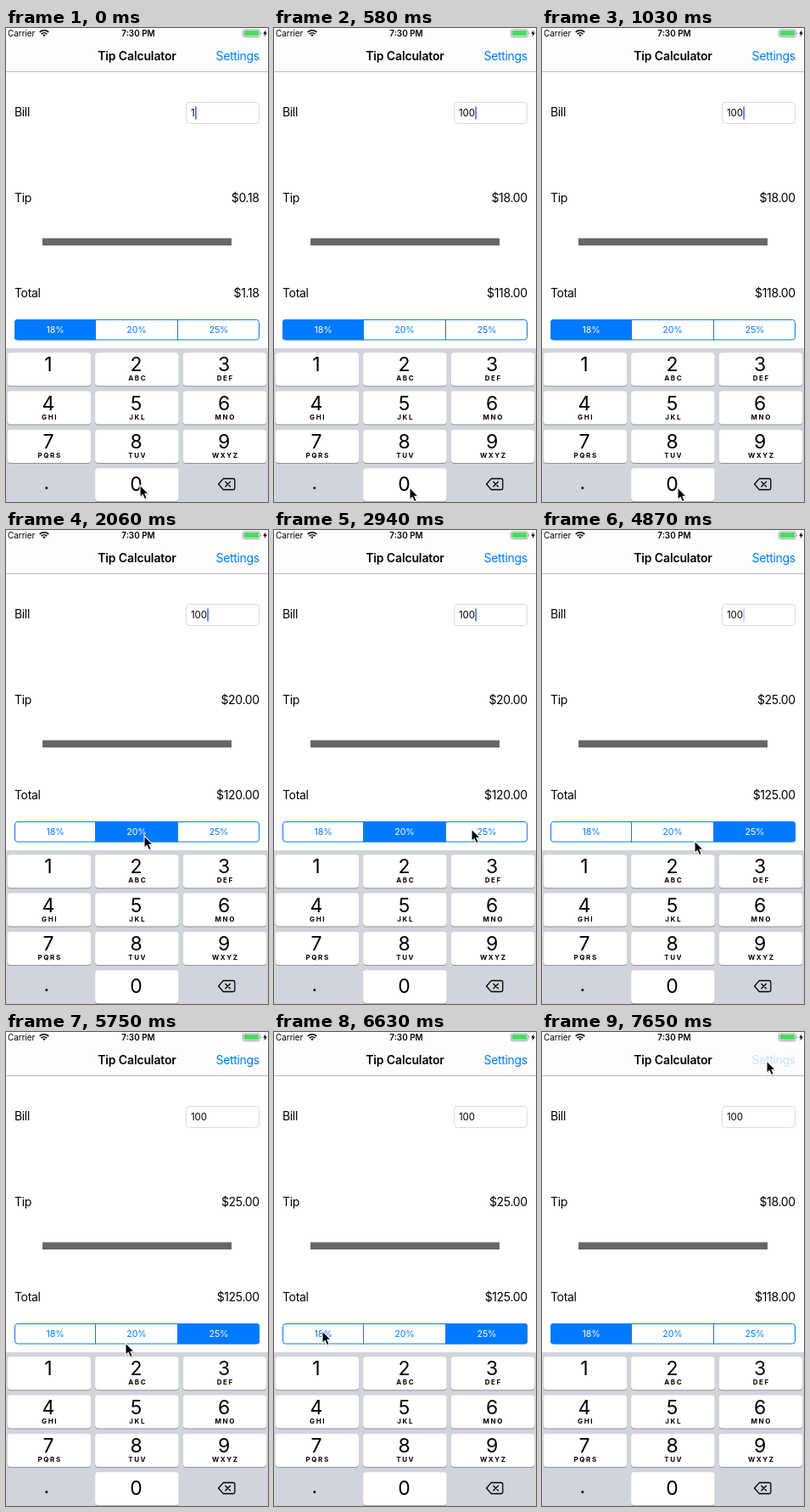
Recreate the animation shown at these times as an HTML page. Size 309x558 px, loop 8 s.

```html
<!DOCTYPE html>
<html lang="en">
<head>
<meta charset="utf-8">
<title>Tip Calculator</title>
<style>
  html, body { margin: 0; width: 100%; height: 100%; overflow: hidden; background: #fff; }
  svg { display: block; width: 309px; height: 558px; font-family: Inter, "Liberation Sans", sans-serif; }
  .body { font-size: 14px; letter-spacing: -.025em; }
  .title { font-size: 14px; font-weight: 600; letter-spacing: -.01em; }
  .status { font-size: 9.9px; }
  .field { font-size: 11.5px; letter-spacing: -.01em; }
  .seg { font-size: 10.7px; letter-spacing: -.01em; }
  .digit { font-size: 23px; }
  .abc { font-size: 8px; font-weight: 700; letter-spacing: 1.6px; }
  .mid { text-anchor: middle; }
  .end { text-anchor: end; }
</style>
</head>
<body>
<svg id="stage" viewBox="0 0 309 558">
  <rect width="309" height="51" fill="#fdfdfd"/>
  <rect y="51" width="309" height="1" fill="#bdbdbd"/>

  <text class="status" x="2" y="10">Carrier</text>
  <g fill="none" stroke="#000" stroke-width="1.7">
    <path d="M39.7 4.9a7.6 7.6 0 0 1 10.6 0M41.7 7.1a4.7 4.7 0 0 1 6.6 0"/>
    <path d="M43.4 8.3a2.3 2.3 0 0 1 3.2 0L45 10.2Z" fill="#000" stroke="none"/>
  </g>
  <text class="status mid" x="156" y="10" font-weight="600">7:30 PM</text>
  <rect x="279.4" y="1.9" width="20" height="8.6" rx="2" fill="none" stroke="#8c8c8c" stroke-width=".8"/>
  <rect x="280.6" y="3.1" width="17.6" height="6.2" rx="1" fill="#4cd964"/>
  <path d="M300.4 4.7q1.4 1.5 0 3Z" fill="#8c8c8c"/>
  <path d="M306.4 2.2 303.2 6.8H305.2L304.4 10.3 308 5.5H305.8Z"/>

  <text class="title mid" x="154.5" y="38">Tip Calculator</text>
  <text class="body end" id="settings" x="298.7" y="38" fill="#007aff">Settings</text>

  <text class="body" x="10" y="104">Bill</text>
  <text class="body" x="10" y="205">Tip</text>
  <text class="body" x="10" y="317">Total</text>
  <rect x="212.5" y="87.5" width="86" height="25" rx="4" fill="#fff" stroke="#dcdcdc"/>
  <text class="field" id="bill" x="218" y="104"></text>
  <rect id="caret" y="92.5" width="1.6" height="15" fill="#426bf2"/>
  <text class="body end" id="tip" x="298.7" y="204.5"></text>
  <text class="body end" id="total" x="298.7" y="317"></text>
  <rect x="43" y="247.5" width="223" height="8.5" fill="#666"/>

  <clipPath id="pill"><rect x="10" y="343" width="289" height="24.5" rx="3.5"/></clipPath>
  <g id="segs" clip-path="url(#pill)"></g>
  <path d="M105.5 343V367.5M202.5 343V367.5" stroke="#007aff"/>
  <rect x="10.5" y="343.5" width="288" height="23.5" rx="3.2" fill="none" stroke="#007aff"/>

  <rect y="377" width="309" height="181" fill="#d1d4da"/>
  <g id="keys"></g>
  <text class="digit mid" x="47.8" y="543">.</text>
  <g fill="none" stroke="#000" stroke-width="1.3" stroke-linejoin="round" stroke-linecap="round">
    <path d="M256.3 530.5H268Q269.8 530.5 269.8 532.3V541.7Q269.8 543.5 268 543.5H256.3L250.6 537Z"/>
    <path d="M258.8 534.2 264.4 539.8M264.4 534.2 258.8 539.8"/>
  </g>

  <g id="pointer">
    <path d="M0 0V14.4L3.2 11.4 5.5 16.8 8.2 15.6 5.9 10.4H10.3Z" fill="#000" opacity=".22" transform="translate(.5 1.4)"/>
    <path d="M0 0V14.4L3.2 11.4 5.5 16.8 8.2 15.6 5.9 10.4H10.3Z" stroke="#fff" stroke-width="1.1"/>
  </g>
</svg>
<script>
const LOOP = 8000, TICK = 147.2, LAST = 52;
const BLUE = '#007aff';
const $ = id => document.getElementById(id);

function add(parent, tag, attrs, text) {
  const el = document.createElementNS('http://www.w3.org/2000/svg', tag);
  for (const k in attrs) el.setAttribute(k, attrs[k]);
  if (text) el.textContent = text;
  return parent.appendChild(el);
}

// Segmented control
const RATES = [18, 20, 25];
const EDGES = [10, 105.5, 202.5, 299];
const segs = RATES.map((rate, i) => ({
  box: add($('segs'), 'rect', { x: EDGES[i], y: 343, width: EDGES[i + 1] - EDGES[i], height: 24.5 }),
  label: add($('segs'), 'text', { class: 'seg mid', x: [58, 154, 251][i], y: 359 }, rate + '%')
}));

// Number pad
const LETTERS = ['', 'ABC', 'DEF', 'GHI', 'JKL', 'MNO', 'PQRS', 'TUV', 'WXYZ'];

function addKey(col, row, digit, letters) {
  const x = 1.5 + col * 103.6, y = 382.3 + row * 45.3, mid = x + 49.3;
  add($('keys'), 'rect', { x, y: y + 1, width: 98.6, height: 39, rx: 4, fill: '#8f9297' });
  const face = add($('keys'), 'rect', { x, y, width: 98.6, height: 39, rx: 4, fill: '#fff' });
  add($('keys'), 'text', { class: 'digit mid', x: mid - .8, y: y + (row === 3 ? 27 : 21.9) }, digit);
  if (letters) add($('keys'), 'text', { class: 'abc mid', x: mid + .8, y: y + 33 }, letters);
  return face;
}
LETTERS.forEach((letters, i) => addKey(i % 3, Math.floor(i / 3), String(i + 1), letters));
const zeroKey = addKey(1, 3, '0');

// Pointer stops: [tick, x, y]
const PATH = [
  [0, 158, 538], [3, 160, 541], [7, 160, 541], [12, 163, 360], [15, 163, 360],
  [20, 233, 352], [27, 233, 352], [33, 180, 366], [35, 141, 366], [41, 141, 366],
  [43, 95, 412], [44, 65, 372], [45, 57, 352], [46, 57, 352], [47, 130, 200],
  [48, 236, 24], [49, 264, 33], [51, 265, 34]
];

// Step tables: [first tick, value]
const BILL = [[0, 1], [2, 10], [4, 100]];
const RATE = [[0, 0], [13, 1], [23, 2], [46, 0]];
const PRESS = [[0, -1], [12, 1], [13, -1], [21, 2], [23, -1]];
const CARET = { 1: 223, 10: 230, 100: 237.3 };

const stepAt = (table, k) => table.filter(row => row[0] <= k).pop()[1];

function pointAt(k) {
  const i = PATH.findIndex(p => p[0] > k);
  if (i < 0) return PATH[PATH.length - 1].slice(1);
  const a = PATH[i - 1], b = PATH[i];
  const u = (k - a[0]) / (b[0] - a[0]);
  return [a[1] + (b[1] - a[1]) * u, a[2] + (b[2] - a[2]) * u];
}

function blink(k) {
  if (k < 6) return 1;
  const p = k * TICK / 1000 % 1;
  const lit = p < .6 ? (.5 - p) / .15 : (p - .8) / .15;
  return Math.max(0, Math.min(1, lit));
}

const money = v => '$' + v.toFixed(2);

function draw(k) {
  const bill = stepAt(BILL, k), sel = stepAt(RATE, k), press = stepAt(PRESS, k);
  const tip = bill * RATES[sel] / 100;
  $('bill').textContent = bill;
  $('tip').textContent = money(tip);
  $('total').textContent = money(bill + tip);
  $('caret').setAttribute('x', CARET[bill]);
  $('caret').setAttribute('opacity', blink(k));
  segs.forEach((s, i) => {
    s.box.setAttribute('fill', i === sel ? BLUE : i === press ? '#d9ebff' : '#fff');
    s.label.setAttribute('fill', i === sel ? '#fff' : BLUE);
  });
  zeroKey.setAttribute('fill', k === 1 || k === 3 ? '#d1d4da' : '#fff');
  $('settings').setAttribute('opacity', k >= 51 ? .2 : 1);
  $('pointer').setAttribute('transform', `translate(${pointAt(k)})`);
}

let shown = -1;
function frame() {
  const t = performance.now() % LOOP;
  const k = Math.min(LAST, Math.floor((t + 12) / TICK));
  if (k !== shown) draw(shown = k);
  requestAnimationFrame(frame);
}
frame();
</script>
</body>
</html>
```
